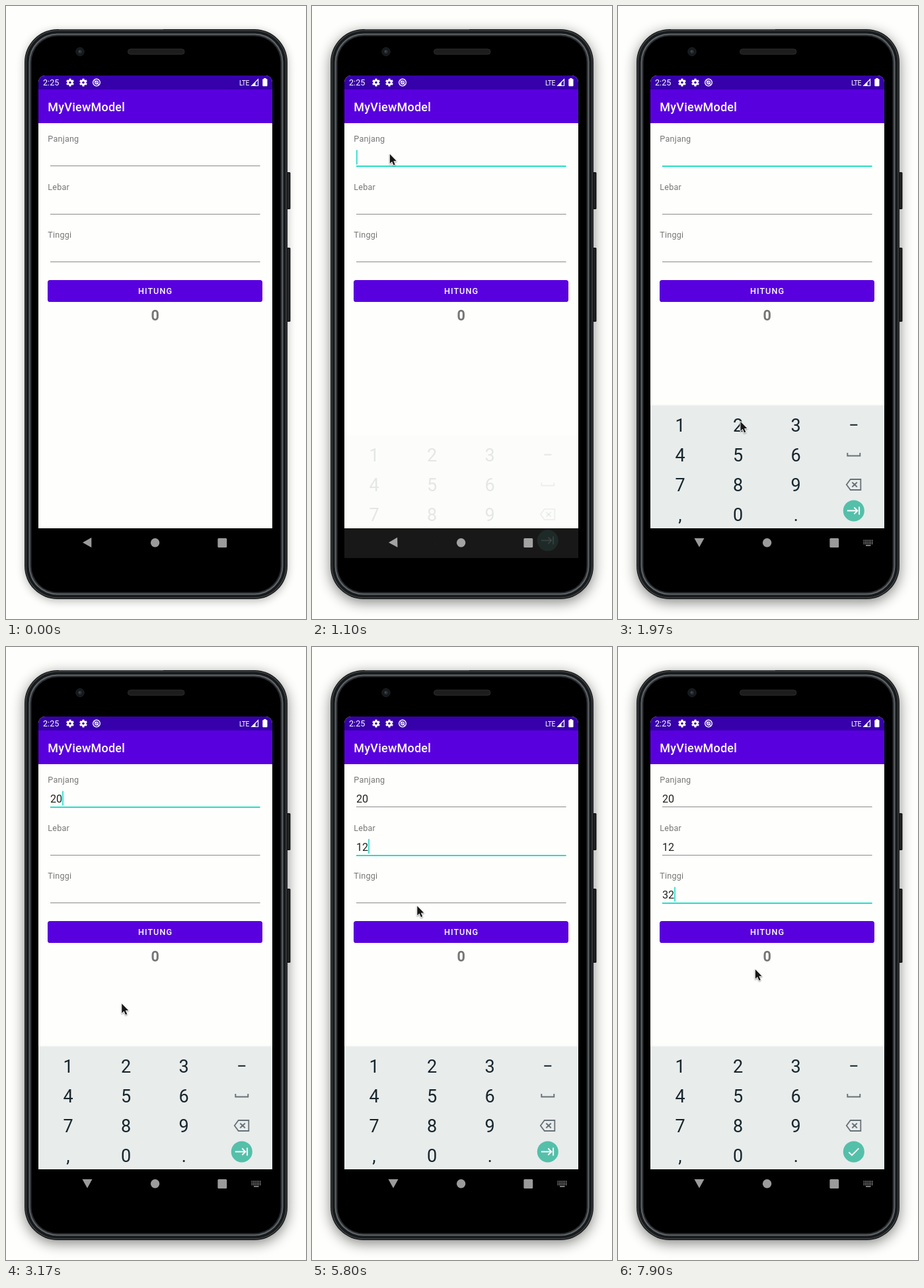
These frames come from a looping animation (454x926 px, 8000 ms). An HTML page with a canvas:

```html
<!DOCTYPE html>
<html lang="id">
<head>
<meta charset="utf-8">
<title>Volume form</title>
<style>
html, body { margin: 0; width: 100%; height: 100%; overflow: hidden; background: #fefffc; }
canvas { display: block; width: 100vw; height: 100vh; }
</style>
</head>
<body>
<canvas id="stage"></canvas>
<script>
const W = 454, H = 926, LOOP = 8000;
const cv = document.getElementById('stage');
const dpr = window.devicePixelRatio || 1;
cv.width = W * dpr;
cv.height = H * dpr;
const c = cv.getContext('2d');

const FONT = 'Roboto, "Noto Sans", sans-serif';
const PAPER = '#fefffc', PURPLE = '#5900df', TEAL = '#2adbc8', NAV = '#9b9b9b';
const LABELS = ['Panjang', 'Lebar', 'Tinggi'];
const KEYS = ['123', '456', '789', ',0.'];
const KB_TOP = 603.5, KB_BOTTOM = 789;

const rowY = i => i * 72.5;
const colX = i => 94 + i * 87.6;
const keyY = r => 633 + r * 45;

const onField = (i, x) => ({ field: i, x, y: 223 + rowY(i) });
function onKey(k) {
  const r = KEYS.findIndex(row => row.includes(k));
  return { key: k, x: colX(KEYS[r].indexOf(k)) + 3, y: keyY(r) - 6 };
}

// The pointer leaves at `from`, glides for `dur`, and taps at `at`.
const START = { x: 50, y: 85 };
const TAPS = [
  { from: 300, dur: 680, at: 1100, ...onField(0, 117) },
  { from: 1370, dur: 600, at: 2170, ...onKey('2') },
  { from: 2170, dur: 500, at: 2970, ...onKey('0') },
  { from: 3000, dur: 867, at: 4070, bend: 38, ...onField(1, 111) },
  { from: 4300, dur: 720, at: 5200, bend: -39, ...onKey('1') },
  { from: 5220, dur: 300, at: 5600, ...onKey('2') },
  { from: 5600, dur: 305, at: 6030, ...onField(2, 156) },
  { from: 6350, dur: 750, at: 7270, ...onKey('3') },
  { from: 7270, dur: 250, at: 7600, ...onKey('2') },
  { from: 7600, dur: 300, at: LOOP, x: 207, y: 486 }
];

const clamp = v => Math.max(0, Math.min(1, v));
const easeOut = k => 1 - (1 - clamp(k)) ** 3;

function formAt(t) {
  const form = { focus: -1, values: ['', '', ''], last: 0 };
  for (const tap of TAPS) {
    if (tap.at > t) break;
    if (tap.key) form.values[form.focus] += tap.key;
    else form.focus = tap.field;
    form.last = tap.at;
  }
  return form;
}

function pointerAt(t) {
  const s = Math.floor((t - 70) / 100) * 100 + 70;
  let { x, y } = START;
  for (const m of TAPS) {
    if (m.from > s) break;
    const k = easeOut((s - m.from) / m.dur);
    x += (m.x - x) * k + (m.bend || 0) * Math.sin(Math.PI * k * k);
    y += (m.y - y) * k;
  }
  return [x, y];
}

function paint(fill, stroke, lw) {
  if (fill) { c.fillStyle = fill; c.fill(); }
  if (stroke) { c.strokeStyle = stroke; c.lineWidth = lw; c.stroke(); }
}
function rect(x, y, w, h, fill) {
  c.fillStyle = fill;
  c.fillRect(x, y, w, h);
}
function round(x, y, w, h, r, fill, stroke, lw = 1) {
  c.beginPath();
  c.roundRect(x, y, w, h, r);
  paint(fill, stroke, lw);
}
function disc(x, y, r, fill, stroke, lw = 1) {
  c.beginPath();
  c.arc(x, y, r, 0, Math.PI * 2);
  paint(fill, stroke, lw);
}
function poly(pts, fill, stroke, lw = 1, close = true) {
  c.beginPath();
  pts.forEach(([x, y]) => c.lineTo(x, y));
  if (close) c.closePath();
  paint(fill, stroke, lw);
}
const line = (pts, color, lw) => poly(pts, null, color, lw, false);
function text(s, x, y, size, color, weight = 400, align = 'left', spacing = 0) {
  c.font = `${weight} ${size}px ${FONT}`;
  c.letterSpacing = spacing + 'px';
  c.textAlign = align;
  c.fillStyle = color;
  c.fillText(s, x, y);
}

function shell(inset, fill) {
  round(28 + inset, 35 + inset, 398 - 2 * inset, 861 - 2 * inset, 50 - inset, fill);
}

function drawPhone(active) {
  for (const [y, h] of [[251, 56], [365, 112]]) {
    round(423, y, 7.5, h, 1.5, '#1b1c1d');
    rect(427, y + 2, 1, h - 4, '#3a3c3e');
  }
  c.save();
  c.shadowColor = active ? 'rgba(0,0,0,.48)' : 'rgba(0,0,0,.28)';
  c.shadowBlur = (active ? 20 : 13) * dpr;
  c.shadowOffsetY = (active ? 5 : 3) * dpr;
  shell(0, '#1a1b1c');
  c.restore();
  shell(1.5, '#44484b');
  shell(2.7, '#17191a');
  shell(6.5, '#5e6469');
  shell(8.5, '#2a2d30');
  shell(10.5, '#000');
  rect(80, 35, 158, 1, '#47494b');

  disc(112, 69, 6.2, '#15181a', '#202326');
  disc(112, 69, 3, '#252c33');
  disc(111.4, 68.6, 1.2, '#45525e');
  round(184.5, 65, 85.5, 8, 4, '#1d1d1d', '#2c2c2c');
}

function gear(x, y) {
  c.save();
  c.translate(x, y);
  for (let i = 0; i < 6; i++) {
    c.rotate(Math.PI / 3);
    rect(-1.5, -5.9, 3, 4, '#fff');
  }
  c.restore();
  disc(x, y, 3.2, null, '#fff', 2.6);
}

function drawBars() {
  c.save();
  c.beginPath();
  c.roundRect(49, 105, 354, 684, [10, 10, 0, 0]);
  c.clip();
  rect(49, 105, 354, 684, PAPER);
  rect(49, 105, 354, 21, '#3600aa');
  rect(49, 126, 354, 51, PURPLE);
  c.restore();

  text('2:25', 56, 120, 12.6, '#fff');
  gear(97, 115.6);
  gear(117, 115.6);
  disc(137, 115.6, 5.3, null, '#fff', 1.4);
  disc(137, 115.6, 2.4, null, '#fff', 1.3);
  line([[134, 112.6], [140, 118.6]], '#fff', 1.3);
  text('LTE', 353, 119.5, 10.4, '#fff', 400, 'left', -.4);
  poly([[371.8, 120.5], [381.5, 120.5], [381.5, 110.8]], null, '#fff', 1.2);
  poly([[371.8, 120.5], [377.5, 120.5], [377.5, 114.8]], '#fff');
  round(388.3, 110.3, 7.2, 11, 1, '#fff');
  rect(390.3, 109, 3.2, 2, '#fff');

  text('MyViewModel', 63.3, 158.8, 18, '#fff', 500, 'left', .23);
}

function drawForm(t, form) {
  LABELS.forEach((label, i) => {
    const y = rowY(i), on = i === form.focus;
    text(label, 63.3, 205.2 + y, 12.6, '#767676', 400, 'left', .22);
    rect(67, Math.round(241 + y), 317.6, on ? 2 : 1, on ? TEAL : '#8b8b8a');
    text(form.values[i], 67, 235 + y, 16.2, '#222');
    if (on && (t - form.last) % 1000 < 500) {
      rect(67 + c.measureText(form.values[i]).width, 217.5 + y, 1.7, 22, TEAL);
    }
  });
  round(63, 414, 325, 33, 3.6, PURPLE);
  text('HITUNG', 226, 435.2, 12.6, '#fff', 500, 'center', 1.06);
  text('0', 225.7, 475.2, 21.6, '#757575', 700, 'center');
}

function drawNav(t) {
  c.save();
  c.translate(123, 810.4);
  c.rotate(-Math.PI / 2 * clamp((t - 1100) / 60));
  poly([[-7, 0], [6.3, -7.5], [6.3, 7.5]], NAV);
  c.restore();
  disc(225.6, 810.8, 6.7, NAV);
  round(320.4, 804, 13.8, 14, 1.5, NAV);
  if (t < 1130) return;
  for (let r = 0; r < 3; r++)
    for (let i = 0; i < 6; i++) rect(371.5 + i * 2.5, 806.5 + r * 2.5, 1.6, 1.6, '#888');
  rect(375, 814, 7.5, 1.8, '#888');
}

function drawKeys(t, focus) {
  if (focus < 0) return;
  const drop = 46 * Math.exp((TAPS[0].at - t) / 43);
  const ink = '#17262d', grey = '#667177';
  c.save();
  c.beginPath();
  c.rect(49, 590, 354, 246);
  c.clip();
  c.globalAlpha = 1 - drop / 50;
  c.translate(0, drop);
  rect(49, KB_TOP - 1, 354, 1, '#f3f5f4');
  rect(49, KB_TOP, 354, KB_BOTTOM - KB_TOP, '#e8eceb');
  KEYS.forEach((row, r) => {
    [...row].forEach((k, i) => text(k, colX(i), keyY(r) + 9.8, 27, ink, 400, 'center'));
  });
  c.translate(colX(3), 0);
  rect(-5.5, 631.8, 11, 2, ink);
  line([[-9.5, 675], [-9.5, 679.5], [9.5, 679.5], [9.5, 675]], grey, 1.9);
  poly([[-11, 723], [-5, 715], [10.5, 715], [10.5, 731], [-5, 731]], null, grey, 1.8);
  line([[-2.5, 719.5], [5, 726.5]], grey, 1.9);
  line([[5, 719.5], [-2.5, 726.5]], grey, 1.9);

  c.translate(0, 762.4);
  disc(0, 0, 16, '#54c0a9');
  if (focus === LABELS.length - 1) {
    line([[-7.5, .7], [-2.8, 5.2], [7.5, -5]], '#fff', 2);
  } else {
    line([[-10, 0], [5, 0]], '#fff', 2);
    line([[.5, -5], [5.5, 0], [.5, 5]], '#fff', 2);
    rect(7.3, -6, 2, 12, '#fff');
  }
  c.restore();
}

function drawPointer(t) {
  if (t < TAPS[0].from) return;
  const [x, y] = pointerAt(t);
  const shape = [[0, 0], [0, 14.3], [3.3, 11.2], [5.7, 16.8], [8, 15.8], [5.6, 10.4], [10, 10.2]];
  c.save();
  c.translate(x + .8, y + .8);
  c.lineJoin = 'round';
  c.shadowColor = 'rgba(0,0,0,.35)';
  c.shadowBlur = 2 * dpr;
  c.shadowOffsetY = dpr;
  poly(shape, '#fff', '#fff', 1.8);
  c.shadowColor = 'transparent';
  poly(shape, '#181818');
  c.restore();
}

function draw(t) {
  const form = formAt(t);
  c.setTransform(dpr, 0, 0, dpr, 0, 0);
  rect(0, 0, W, H, PAPER);
  drawPhone(t >= 1070);
  drawBars();
  drawForm(t, form);
  drawNav(t);
  drawKeys(t, form.focus);
  drawPointer(t);
}

const start = performance.now();
function tick() {
  draw((performance.now() - start) % LOOP);
  requestAnimationFrame(tick);
}
tick();
</script>
</body>
</html>
```
